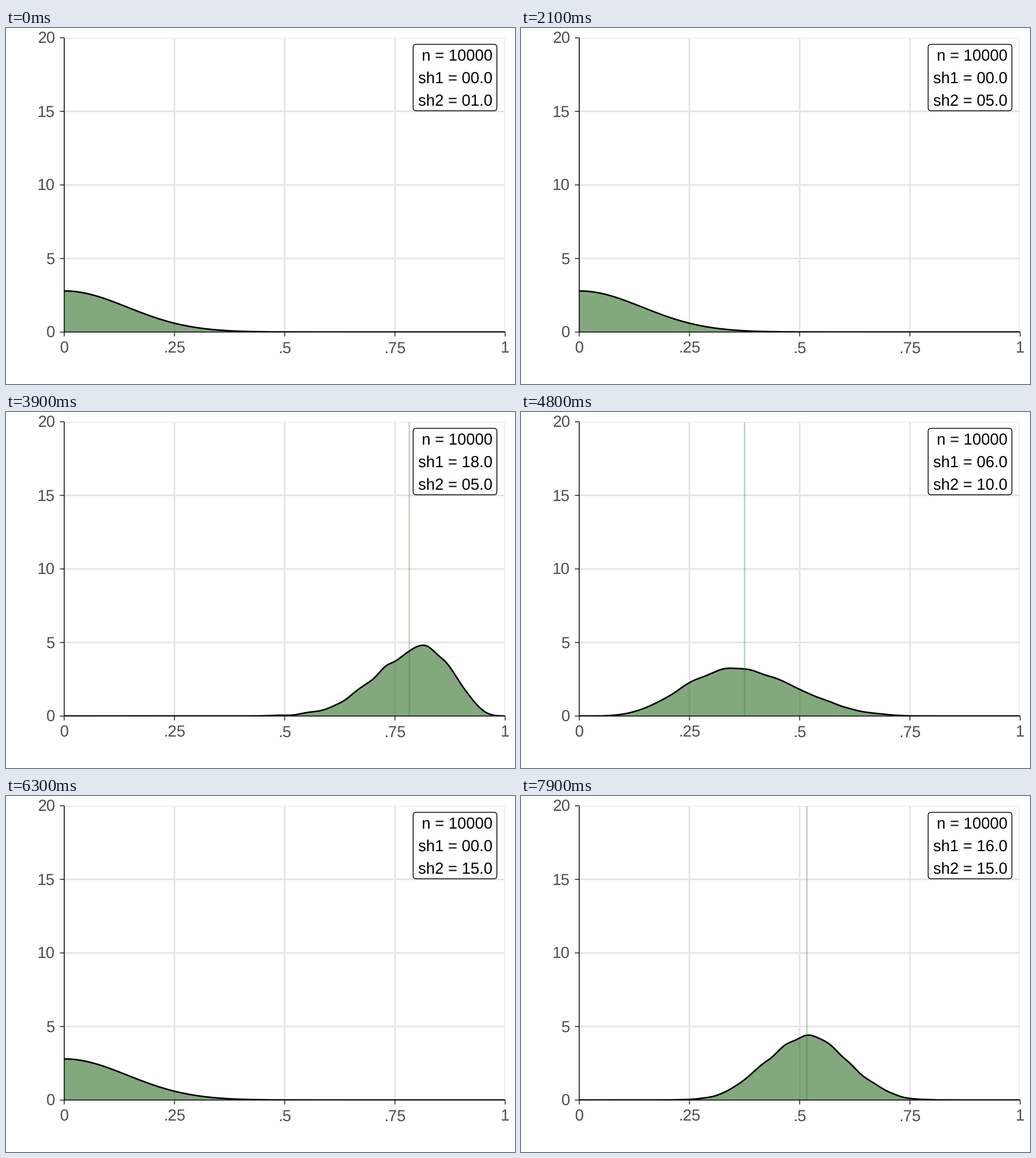
A matplotlib script for the animation above (8 s loop, 857x600 px).

```python
import numpy as np
import matplotlib.pyplot as plt
from matplotlib.animation import FuncAnimation
from matplotlib.patches import FancyBboxPatch, Polygon, Rectangle

W, H, DPI = 857, 600, 64
LEFT, RIGHT, TOP, BOTTOM = 98, 840.5, 16.5, 512.5
GREEN = (0.188, 0.431, 0.157)
N = 10000
SH2 = (1, 5, 10, 15)
STEPS = 21          # sh1 runs 0..20 for every sh2
FRAMES = 80
BINS = 4000
MID = (np.arange(BINS) + .5) / BINS
GRID = np.linspace(0, 1, 401)

plt.rcParams.update({
    "font.family": "Liberation Sans",
    "path.snap": False,
    "text.hinting": "none",
    "toolbar": "None",
})


def pt(px):
    return px * 72 / DPI


def sx(v):
    return LEFT + (RIGHT - LEFT) * v


def sy(v):
    return BOTTOM - (BOTTOM - TOP) * v / 20


def sample(a, b):
    """Binned shares of N beta draws; all mass sits at zero when a is 0."""
    if a == 0:
        return (np.arange(BINS) == 0).astype(float)
    draws = np.random.default_rng(100 * b + a).beta(a, b, N)
    return np.histogram(draws, BINS, (0, 1))[0] / N


def density(a, b):
    """Gaussian kernel estimate with the rule-of-thumb bandwidth."""
    w = sample(a, b)
    sd = np.sqrt(w @ (MID - w @ MID) ** 2)
    q1, q3 = np.interp((.25, .75), np.cumsum(w), MID)
    bw = .9 * (min(sd, (q3 - q1) / 1.34) or 1) * N ** -.2
    z = (GRID[:, None] - MID) / bw
    return np.exp(-z * z / 2) @ w / (bw * np.sqrt(2 * np.pi))


fig = plt.figure(figsize=(W / DPI, H / DPI), dpi=DPI, facecolor="white")
ax = fig.add_axes([0, 0, 1, 1])
ax.set_xlim(0, W)
ax.set_ylim(H, 0)
ax.axis("off")

panel = Rectangle((LEFT, TOP), RIGHT - LEFT, BOTTOM - TOP,
                  transform=ax.transData)


def line(xs, ys, color, width, z, clip=False, **kw):
    ln, = ax.plot(xs, ys, color=color, lw=pt(width), zorder=z,
                  solid_capstyle="butt", clip_on=clip, **kw)
    if clip:
        ln.set_clip_path(panel)
    return ln


def text(x, y, s, ha, color):
    return ax.text(x, y, s, ha=ha, va="baseline", color=color,
                   fontsize=pt(26.67), zorder=6)


def grid_line(xs, ys):
    line(xs, ys, "#e5e5e5", 2.8, 1, clip=True)


def axis_line(xs, ys, color="black"):
    line(xs, ys, color, 1.4, 5)


for i, name in enumerate(("0", ".25", ".5", ".75", "1")):
    x = sx(i / 4)
    grid_line((x, x), (TOP, BOTTOM))
    axis_line((x, x), (BOTTOM, BOTTOM + 7.3), "#1a1a1a")
    text(x, 547.3, name, "center", "#4d4d4d")
for v in range(0, 21, 5):
    y = sy(v)
    grid_line((LEFT, RIGHT), (y, y))
    axis_line((LEFT - 7.3, LEFT), (y, y), "#1a1a1a")
    text(83, y + 9.5, str(v), "right", "#4d4d4d")
axis_line((LEFT, LEFT), (TOP, BOTTOM))
axis_line((LEFT, RIGHT), (BOTTOM, BOTTOM))

area = Polygon([(0, 0), (1, 1), (1, 0)], closed=True, facecolor=(*GREEN, .6),
               edgecolor="none", lw=0, zorder=2)
ax.add_patch(area)
area.set_clip_path(panel)
curve = line(sx(GRID), sy(0 * GRID), "black", 2.6, 2.5, clip=True)
mean_line = line((LEFT, LEFT), (TOP, BOTTOM), GREEN, 2.6, 3, clip=True,
                 alpha=.3)

ax.add_patch(FancyBboxPatch((685.5, 27.5), 141, 112,
                            boxstyle="round,pad=0,rounding_size=5",
                            facecolor="white", edgecolor="black",
                            lw=pt(1.4), zorder=4))
text(819, 55.5, f"n = {N}", "right", "black")
sh1_text = text(819, 93, "", "right", "black")
sh2_text = text(819, 130.5, "", "right", "black")


def update(k):
    a, b = k % STEPS, SH2[k // STEPS]
    ys = sy(density(a, b))
    curve.set_ydata(ys)
    area.set_xy([(LEFT, BOTTOM), *zip(sx(GRID), ys), (RIGHT, BOTTOM)])
    x = sx(a / (a + b))
    mean_line.set_xdata((x, x))
    sh1_text.set_text(f"sh1 = {a:04.1f}")
    sh2_text.set_text(f"sh2 = {b:04.1f}")
    return area, curve, mean_line, sh1_text, sh2_text


anim = FuncAnimation(fig, update, frames=FRAMES, interval=100, repeat=True,
                     repeat_delay=0, blit=False)
plt.show()
```
